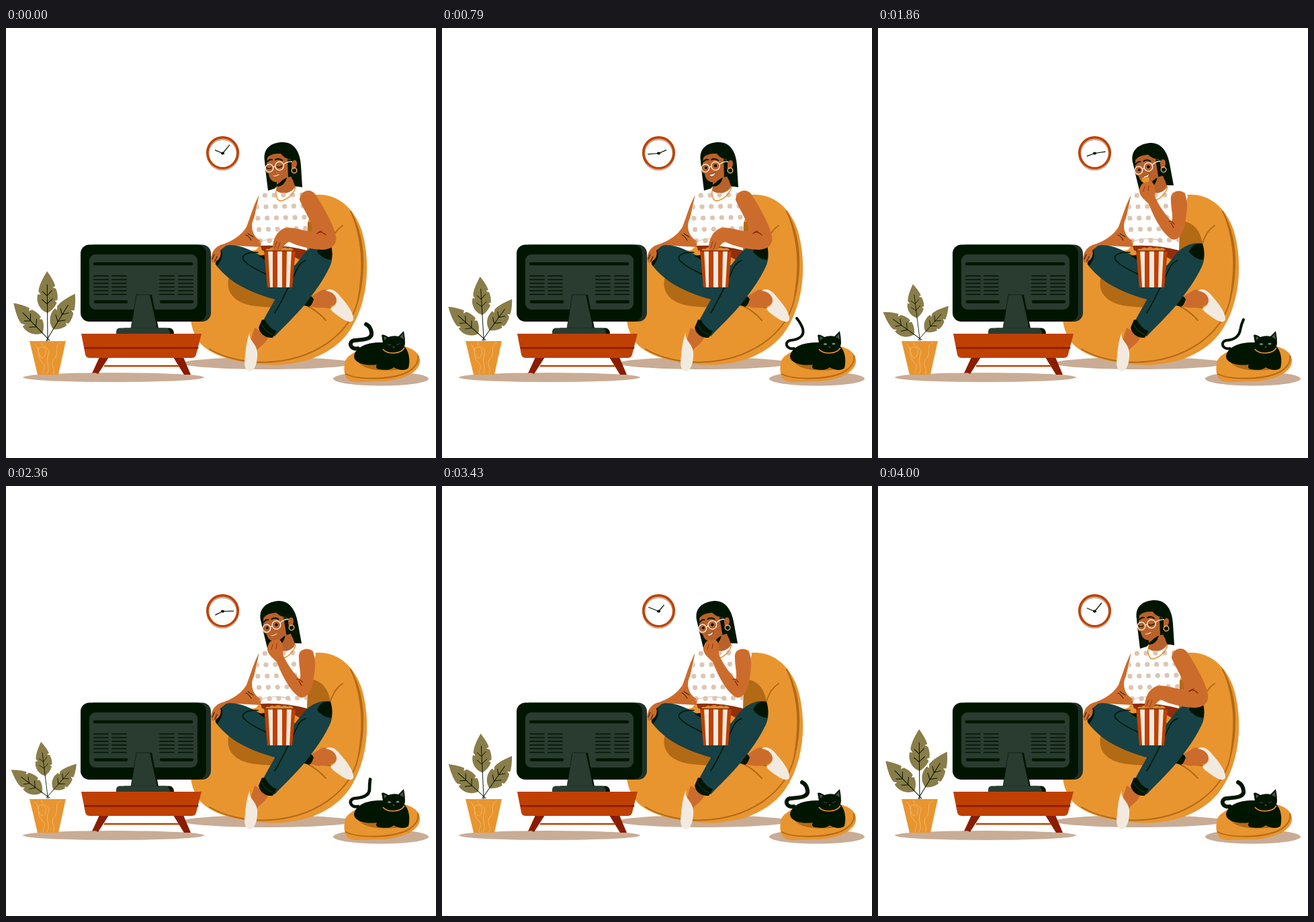
Write an HTML page that moves like this. It is 640 px wide and 640 px high and loops after 4.21 s.

```html
<!DOCTYPE html>
<html lang="en">
<head>
<meta charset="utf-8">
<title>Evening at home</title>
<style>
html, body { margin: 0; width: 100%; height: 100%; overflow: hidden; background: #fff; }
svg { display: block; width: 100vw; height: 100vh; }
.ink { fill: #001500; }
.or { fill: #e89530; }
.red { fill: #bf4000; }
.wine { fill: #8a1c00; }
.shade { fill: #b36a15; }
.floor { fill: #c9ac95; }
.grey { fill: #2a3b30; }
.jean { fill: #174144; }
.skin { fill: #cc6c2c; }
.face { fill: #b9612a; }
.shoe { fill: #f3eadf; }
.line { fill: none; stroke: #001500; stroke-linecap: round; stroke-linejoin: round; }
.seam { fill: none; stroke: #b36a15; stroke-width: 2; stroke-linecap: round; }
</style>
</head>
<body>
<svg viewBox="0 0 640 640">
  <defs>
    <path id="shirt" d="M377 248 L400 240 Q414 252 430 236 L446 238 Q460 242 461 251 L449 290 L448 332 Q410 322 379 325 L380 317 C368 312 364 298 367 288 C374 274 374 260 377 248Z"/>
    <clipPath id="top"><use href="#shirt"/></clipPath>
    <g id="leaf">
      <path fill="#897d49" d="M0 0 C-8 -3 -14 -10 -15 -20 C-15 -23 -15 -25 -14 -28 L-10 -27 L-13 -32 C-12 -42 -6 -52 0 -62 C5 -55 10 -47 12 -40 L8 -38 L13 -36 C15 -31 16 -25 15 -19 L11 -18 L14 -15 C11 -8 6 -3 0 0Z"/>
      <path class="line" stroke-width="1" d="M0 0V-42M0 -13L-8 -20M0 -14L8 -21M0 -25L-7 -32M0 -26L7 -33"/>
    </g>
  </defs>

  <ellipse class="floor" cx="390" cy="499" rx="127" ry="9"/>
  <ellipse class="floor" cx="160" cy="520" rx="135" ry="7"/>
  <ellipse class="floor" cx="558" cy="522" rx="71" ry="10.5"/>

  <!-- clock -->
  <circle class="floor" cx="322.5" cy="188" r="24.3"/>
  <circle class="red" cx="322.5" cy="185.5" r="24.5"/>
  <circle class="floor" cx="322.5" cy="185.5" r="21"/>
  <circle fill="#fff" cx="322.5" cy="187" r="20"/>
  <path id="minute" class="line" stroke-width="1.2" d="M322.5 186.5V170.5"/>
  <path id="hour" class="line" stroke-width="1.3" d="M322.5 186.5V174.5"/>
  <ellipse class="ink" cx="322.5" cy="186.5" rx="2.6" ry="2"/>

  <!-- bean bag -->
  <path class="or" d="M455 249 C489 243 518 265 530 303 C543 350 539 407 513 448 C490 484 445 502 395 501.500 C352 500 300 490 284 462 C279 452 275 443 275 430 C276 380 290 355 308 345 L372 330Z"/>
  <path class="shade" d="M512 272 C535 305 537 360 525 405 C533 360 529 310 512 272Z"/>
  <path class="seam" d="M513 273 C533 310 532 360 524 405 C512 455 460 495 385 497.500 C355 498 325 491 303 478"/>
  <path class="shade" d="M446 290 C462 283 480 297 483 322 L446 340Z"/>
  <path class="shade" d="M334 366 C324 386 335 408 365 413 C395 418 420 415 440 412 L400 372Z"/>
  <path class="seam" d="M501 294 C492 300 486 310 483 320M447 413 C458 418 468 426 476 435M452 412L488 417"/>

  <!-- plant -->
  <g id="leaves"></g>
  <path class="or" d="M35 466H89L78 516H47Z"/>
  <path fill="none" stroke="#f1b765" stroke-width="1" d="M43 470C52 480 45 490 54 498S52 510 56 515M53 467C51 476 68 474 63 486S67 504 61 515M82 468C70 474 80 484 72 492S75 508 70 515M49 476C57 472 62 480 58 488S46 486 49 476"/>

  <!-- hair behind the neck -->
  <g class="head">
    <path class="ink" d="M385 198 C382 179 395 170 412 170 C430 170 438 186 439 205 L441 237 L426 235 L414 224 L400 239 L390 242 C388 225 386 210 385 198Z"/>
  </g>

  <!-- far arm, torso -->
  <path class="skin" d="M377 248 C369 262 364 280 358 296 C351 308 338 317 320 323 L380 326 L381 316 C372 310 368 300 368 288Z"/>
  <path class="face" d="M404 220 H424 L431 237 C424 246 414 249 402 243Z"/>
  <use href="#shirt" fill="#fff"/>
  <path class="face" d="M406 228 L427 226 L430 237 C424 246 412 249 402 242Z"/>
  <g id="dots" clip-path="url(#top)" fill="#dcc5b3"></g>
  <path fill="none" stroke="#d9c0a8" stroke-width="1.2" d="M377 319 C388 313 412 311 424 319"/>
  <path fill="#8f2f0c" d="M379 324 Q415 322 448 331 L443 348 L428 340 L381 331Z"/>

  <!-- legs -->
  <path class="skin" d="M452 401 L470 390 C482 388 491 394 493 405 C490 417 470 419 452 414Z"/>
  <path class="shoe" d="M476 391 C482 386 492 391 498 400 C507 410 518 424 517 434 C514 441 503 435 495 429 C488 424 481 419 484 416 C492 413 494 405 490 399 C486 393 481 392 476 391Z"/>
  <path class="jean" d="M312 352 C310 334 319 323 333 323 C352 323 368 333 384 341 L440 356 L450 414 C410 409 365 396 338 377 C326 368 318 360 312 352Z"/>
  <path class="ink" d="M446 398 C452 396 457 401 458 404 C456 409 455 413 451 415 L443 412Z"/>
  <path class="ink" d="M376 339 L390 337 V348Z"/>
  <path class="skin" d="M370 446 L391 458 C388 470 378 473 371 482 L362 472Z"/>
  <path class="shoe" d="M363 453 C361 466 372 468 374 482 C375 495 371 511 363 511 C355 510 354 500 356 488 C357 474 359 462 363 453Z"/>
  <path class="jean" d="M442 338 C452 325 470 318 480 321 C487 328 487 345 482 355 C472 376 460 392 446 410 C431 428 414 444 400 459 L378 445 C393 415 415 380 428 356Z"/>
  <path class="ink" d="M463 333 C467 323 476 319 483 321 C486 330 486 338 484 345 C476 345 468 340 463 333Z"/>
  <path class="ink" d="M381 434 L386 435 C390 443 396 449 403 451 L397 461 C387 462 378 456 376 446Z"/>
  <path class="line" stroke-width="1.5" d="M375 334 C360 333 350 338 353 345 C361 354 374 360 388 367M446 346 C435 350 434 358 427 372 C418 390 410 408 400 424"/>
  <path fill="none" stroke="#174144" d="M381 442 C384 448 390 454 397 456"/>
  <path class="ink" d="M317 327 C324 331 324 343 314 354 L312 351Z"/>
  <path class="skin" d="M323 322 C312 324 306 333 305 343 C305 350 310 351 313 347 C319 344 321 335 319 331 L330 322Z"/>
  <path class="line" stroke-width="1" d="M357 308 Q361 309 365 316M360 306 L368 311M310 337L307 344M314 340L311 347"/>

  <!-- face -->
  <path fill="none" stroke="#e89530" stroke-width="1.5" d="M402 242 C401 252 405 259 411 257 C421 254 429 246 431 236"/>
  <g class="head">
    <path class="ink" d="M402 234 C406 231 411 228 413 223 L418 223 C416 230 411 236 404 236Z"/>
    <path class="face" d="M389 193 C394 187 402 187 409 187 C413 193 420 195 424 196 L424 222 C417 221 414 226 407 229 C398 231 392 226 391 217 L386 214 C388 208 388 201 389 193Z"/>
    <path class="ink" d="M419 195 L427 198 L426 221 L420 222Z"/>
    <path class="face" d="M425 201 C428 194 434 196 433 203 C432 209 428 211 425 209Z"/>
    <circle cx="429" cy="212" r="3.8" fill="none" stroke="#f0b15b" stroke-width="1.4"/>
    <path class="line" stroke-width="2" d="M389 199 Q392 195 396 196M401 196 Q406 193 411 197"/>
    <path id="shut" class="line" stroke-width="1.2" d="M388 208 Q391 211 395 208M403 206 Q407 209 411 205"/>
    <g id="open" class="ink"><circle cx="393" cy="208" r="2"/><circle cx="407" cy="205" r="2.2"/></g>
    <g fill="none" stroke="#fff3e5" stroke-width="1.3">
      <circle cx="392" cy="208.5" r="5.8"/><circle cx="407" cy="205.3" r="6.3"/>
      <path d="M398 207 L401 206M413 203 Q419 198 426 199"/>
    </g>
    <path id="calm" fill="none" stroke="#f5d9c2" stroke-width="1.2" stroke-linecap="round" d="M398 220 Q402 221 406 218"/>
    <path id="smile" fill="#fff" stroke="#7d2808" stroke-width=".7" d="M397 218 Q402 219 407 215 Q406 221 400 221Z"/>
  </g>

  <!-- popcorn and near arm -->
  <path fill="#d98a2c" d="M386 333 Q386 327 392 329 Q395 325 400 328 Q405 324 410 328 Q415 325 419 328 Q426 325 429 333Z"/>
  <path id="snack" class="or" d="M393 228 Q391 221 397 222 Q403 219 404 226 Q403 233 397 232Z"/>
  <path id="arm" class="skin"/>
  <path id="crease" fill="none" stroke="#8a1c00" stroke-linecap="round" stroke-width="1.2"/>
  <path id="fingers" fill="none" stroke="#8f3510" stroke-linecap="round"/>
  <path class="red" d="M384 331H431L426 386H389Z"/>
  <path class="shoe" d="M390 331H397V386H393ZM404 331H411V386H404ZM418 331H425L422 386H417Z"/>
  <path fill="#8a2a05" d="M384 331H431V332.5H384Z"/>

  <!-- television -->
  <rect x="118" y="322.5" width="187" height="114.5" rx="13" fill="#203027"/>
  <rect class="ink" x="111" y="322.5" width="187" height="114.5" rx="13"/>
  <rect class="grey" x="124" y="337" width="161" height="82" rx="9"/>
  <g id="vents" class="line"></g>
  <path class="ink" d="M213 397H217L227 447H218Z"/>
  <path class="grey" d="M194 397H214L225 447H186Z"/>
  <path fill="none" stroke="#001500" stroke-width=".6" d="M186 446.5L194 397H214"/>
  <path class="ink" d="M176 446.5 H244 Q250 448 250 455 H176Z"/>
  <path class="grey" d="M169 446.5 H238 Q244 448 244 455 H164 Q163 447 169 446.5Z"/>
  <path class="wine" d="M139 490H153L137 515Q133 512 128 514ZM249 490H264L275 516H265Z"/>
  <path fill="none" stroke="#bf4000" stroke-width="2.5" d="M146 503H258"/>
  <path class="red" d="M112 455 H291 L283 486 Q282 491 276 491 H125 Q119 491 118 486Z"/>
  <path class="wine" d="M116.5 475H286.5L286 477.5H117Z"/>

  <!-- cat -->
  <path class="or" d="M505 495 C512 481 540 473 570 472 C602 471 618 483 616 498 C613 514 590 524 560 526 L520 527 C504 527 501 512 505 495Z"/>
  <path class="seam" d="M506 515 C522 524 572 524 596 513 C609 506 615 498 613 488"/>
  <path class="shade" d="M523 495 C530 508 552 511 580 509 L598 504 L560 490Z"/>
  <path id="tail" class="line"/>
  <path class="ink" d="M518 488 C521 474 538 467 562 468 L592 473 C600 480 602 495 599 506 C595 510 585 510 577 505 C572 510 562 509 556 508 C551 508 550 504 552 501 C538 503 518 500 518 488Z"/>
  <path class="ink" d="M559 457 Q562 455 569 460 Q577 457 584 459 L592 451 Q594 461 594 469 C593 480 585 484 577 484 C567 484 560 478 561 469Z"/>
  <path fill="#46544a" d="M562 459L567 461L563 465ZM591 455L586 460L592 463ZM575 474H579L577 476.5Z"/>
  <g id="catOpen" fill="#71857b"><ellipse cx="570.5" cy="470.5" rx="2.6" ry="1.6"/><ellipse cx="583" cy="470" rx="2.6" ry="1.6"/></g>
  <path id="catShut" fill="none" stroke="#46544a" d="M568 470.5 Q571 473 573 471M581 471 Q583 472 586 469.5"/>
  <path fill="none" stroke="#e89530" stroke-width="1.5" d="M561 478 C567 486 587 486 593 476"/>
</svg>
<script>
const LOOP = 4210, TURN = 2105, REST = 4000;
const $ = id => document.getElementById(id);

// Static repeats
let dots = '';
for (let r = 0; r < 5; r++)
  for (let c = 0; c < 7; c++)
    dots += `<circle cx="${371.5 + r * 1.7 + c * 13.8}" cy="${249.5 + r * 16.8 - c * .3}" r="3.6"/>`;
$('dots').innerHTML = dots;

let slots = '<path stroke-width="4.5" d="M132 351H276M133 407.5H179M231 407.5H277"/><path stroke-width="1.7" d="';
for (let i = 0; i < 6; i++)
  for (const x of [131, 158, 229, 257]) slots += `M${x} ${369 + i * 5.5}h21`;
$('vents').innerHTML = slots + '"/>';

// angle, stem length, swing, shrink
const leaves = [[-44, 11, -11.5, .09], [-.5, 38, -7.5, .21], [31.5, 16, 11.5, .195]];
$('leaves').innerHTML = leaves.map(([, d]) =>
  `<g><path class="line" stroke-width="1" d="M0 4V${-d}"/><use href="#leaf" y="${-d}"/></g>`).join('');

// Interpolates every number in two strings of the same form
function mix(a, b, k) {
  const to = b.match(/-?[\d.]+/g);
  let i = 0;
  return a.replace(/-?[\d.]+/g, n => +n + (to[i++] - n) * k);
}
function at(keys, t) {
  const i = keys.findIndex(k => k[0] > t);
  if (i < 0) return keys[keys.length - 1][1];
  const [t0, a] = keys[i - 1], [t1, b] = keys[i];
  return a === b ? a : mix(a, b, (t - t0) / (t1 - t0));
}
const show = (id, on) => $(id).style.visibility = on ? 'visible' : 'hidden';

// Near arm: in the bucket, lifted, at the mouth
const poses = {
  arm: [
    'M437 256 C437 243 452 237 460 247 C472 265 489 295 491 310 C493 324 483 330 470 330 C452 329 435 325 421 318 C414 322 411 328 408 333 C404 335 396 332 397 325 C398 315 402 303 414 298 C426 295 440 301 453 303 C462 300 448 280 437 256Z',
    'M437 256 C437 243 452 237 460 247 C470 262 481 290 482 305 C482 320 472 324 460 318 C446 311 432 301 418 291 C406 292 394 292 385 292 C379 292 376 285 381 278 C386 270 400 267 410 269 C422 275 440 285 453 296 C458 292 448 280 437 256Z',
    'M436 256 C434 243 450 238 457 247 C462 260 460 275 457 290 C455 305 448 315 440 315 C430 313 415 293 403 262 C397 256 389 250 389 242 C390 234 395 228 401 230 C410 224 414 238 412 250 C416 262 428 278 437 288 C440 280 436 270 436 256Z'
  ],
  crease: ['M463 306 Q468 301 476 308 M465 304 L470 302', 'M453 296 Q459 294 466 300 M456 299 L464 303', 'M433 288 Q437 286 441 292 M436 290 L440 297'],
  fingers: ['M403 318 L400 327 M408 319 L404 329', 'M388 282 L382 288 M394 284 L387 291', 'M397 236 L395 243 M403 235 L402 242']
};
const armKeys = Object.entries(poses).map(([id, [a, b, c]]) =>
  [id, [[0, a], [850, a], [1290, b], [1650, c], [3500, c], [3750, b], [REST, a]]]);

const level = 'translate(0 0) rotate(0 430 236)', lean = 'translate(-1 -1.5) rotate(-7 430 236)';
const headKeys = [[0, level], [1290, level], [1600, lean], [3550, lean], [3850, level]];

const root = 'M524 477 C512 479 509 467 518 465 C530 464 ';
const curl = root + '546 464 544 453 C543 447 540 443 536 441';
const tailKeys = [
  [0, curl],
  [790, root + '540 459 537 448 C535 441 532 437 528 432'],
  [1290, root + '538 460 538 450 C538 443 537 438 535 433'],
  [1860, root + '537 460 539 450 C540 444 542 438 544 434'],
  [2860, root + '545 463 543 452 C542 446 541 442 540 439'],
  [3430, curl]
];
const tailWidth = [[0, '6'], [790, '4'], [1860, '4'], [2860, '5.5'], [3430, '6']];

function draw(now) {
  const t = now % LOOP;
  const p = t < TURN ? t / TURN : Math.max(0, (REST - t) / (REST - TURN));

  $('minute').setAttribute('transform', `rotate(${40 - 360 * p} 322.5 186.5)`);
  $('hour').setAttribute('transform', `rotate(${292 + 360 * p} 322.5 186.5)`);
  leaves.forEach(([angle, , swing, shrink], i) =>
    $('leaves').children[i].setAttribute('transform',
      `translate(62 462) rotate(${angle + swing * p}) scale(${1 - shrink * p})`));

  for (const [id, keys] of armKeys) $(id).setAttribute('d', at(keys, t));
  for (const part of document.querySelectorAll('.head')) part.setAttribute('transform', at(headKeys, t));
  $('tail').setAttribute('d', at(tailKeys, t));
  $('tail').setAttribute('stroke-width', at(tailWidth, t));

  const smiling = t > 350 && t < 2300 || t > 3150 && t < 3800;
  const awake = t > 350 && t < 2600 || t > 3150 && t < 3800;
  const catAwake = t > 350 && t < 2500;
  show('smile', smiling);
  show('calm', !smiling);
  show('open', awake);
  show('shut', !awake);
  show('catOpen', catAwake);
  show('catShut', !catAwake);
  show('snack', t > 1600 && t < 2150);
}

const start = performance.now();
function tick() {
  draw(performance.now() - start);
  requestAnimationFrame(tick);
}
tick();
</script>
</body>
</html>
```
